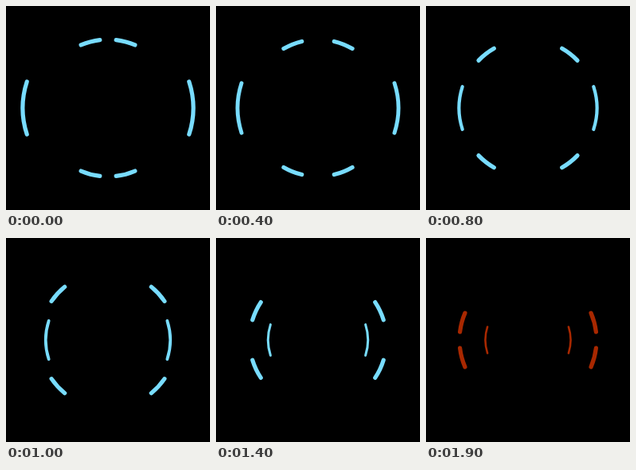
An HTML page with a canvas that plays this animation: 256x256 px, repeating every 2900 ms.

```html
<!DOCTYPE html>
<html lang="en">
<head>
<meta charset="utf-8">
<title>Converging arcs</title>
<style>
  html, body { margin: 0; width: 100%; height: 100%; overflow: hidden; background: #000; }
  canvas { display: block; }
</style>
</head>
<body>
<canvas id="stage" width="256" height="256"></canvas>
<script>
const ctx = document.getElementById('stage').getContext('2d');
const LOOP = 2900, STEP = 100, STEPS = 19;
const MOVING = '#78dcff', STOPPED = '#a82800';
const rad = degrees => degrees * Math.PI / 180;
const smooth = x => x * x * (3 - 2 * x);

function arc(radius, middle, half, width) {
  ctx.lineWidth = width;
  ctx.beginPath();
  ctx.arc(128, 128, radius, rad(middle - half), rad(middle + half));
  ctx.stroke();
}

function draw(time) {
  const step = Math.min(Math.floor(time % LOOP / STEP), STEPS);
  const progress = smooth(step / STEPS);

  ctx.fillStyle = '#000';
  ctx.fillRect(0, 0, 256, 256);
  ctx.lineCap = 'round';
  ctx.strokeStyle = step < STEPS ? MOVING : STOPPED;

  // Side arcs shrink to half size.
  const scale = 1 - progress / 2;
  for (const side of [0, 180]) arc(107 * scale, side, 18, 5.2 * scale);

  // Four short arcs swing from top and bottom towards the sides.
  const swing = 75 - 60 * progress;
  for (const middle of [swing, -swing, 180 - swing, 180 + swing]) arc(86, middle, 8.2, 5.2);
}

const start = performance.now();
function tick() {
  draw(performance.now() - start);
  requestAnimationFrame(tick);
}
tick();
</script>
</body>
</html>
```
